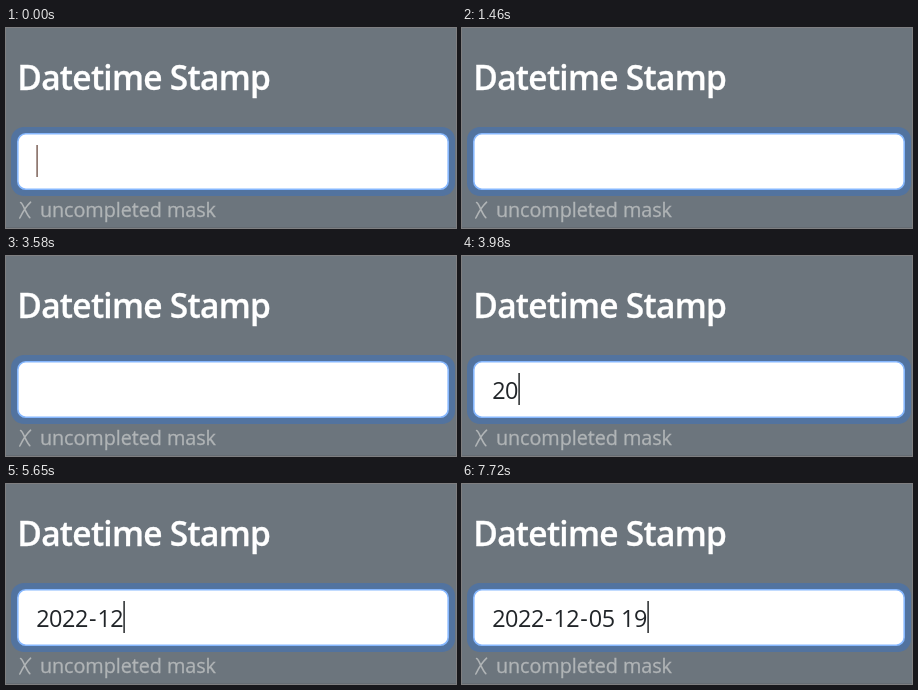
These frames come from a looping animation (450x200 px, 8 s). An HTML page:

```html
<!DOCTYPE html>
<html lang="en">
<head>
<meta charset="utf-8">
<title>Datetime Stamp</title>
<style>
  html, body { margin: 0; width: 100%; height: 100%; overflow: hidden; background: #6c757d; }
  svg { display: block; width: 450px; height: 200px; }
  text { font-family: "Open Sans", "Noto Sans", sans-serif; white-space: pre; }
  .title { font-size: 33.5px; font-weight: 600; letter-spacing: -0.72px; fill: #fff; stroke: #fff; stroke-width: 0.3px; }
  .hint { font-size: 19.8px; letter-spacing: -0.05px; fill: #b0b4b6; stroke: #b0b4b6; stroke-width: 0.3px; }
  .value { font-size: 23.4px; fill: #212529; }
</style>
</head>
<body>
<svg viewBox="0 0 450 200">
  <rect width="450" height="200" fill="#6c757d"/>
  <rect y="199" width="450" height="1" fill="#656c73"/>
  <text class="title" x="11.3" y="62">Datetime Stamp</text>
  <rect x="5" y="99" width="444" height="69" rx="13" fill="#52739f"/>
  <rect x="11.8" y="105.8" width="430.4" height="55.4" rx="8" fill="#fff" stroke="#86b7fe" stroke-width="1.6"/>
  <text class="value" id="value" y="142.8"></text>
  <rect id="caret" y="117" width="1.4" height="32"/>
  <path d="M14.6 174.5C17 175 19.6 185.5 23.8 189.6M24.6 174.2C20.5 178 16.5 184.5 13.8 190" fill="none" stroke="#b0b4b6" stroke-width="1.6" stroke-linecap="round"/>
  <text class="hint" x="33.9" y="189">uncompleted mask</text>
</svg>
<script>
const LOOP = 8000;
const STAMP = "2022-12-05 19";
const START = 30.2;
const ADVANCE = { "-": 9.6, " ": 6.5 };
const DIGIT = 12.9;

// [time, typed characters, caret x]; a null x hides the caret
const steps = [
  [0, 0, 30], [400, 0, null], [930, 0, 30], [1460, 0, null],
  [1990, 0, 30], [2520, 0, null], [3060, 0, 30], [3580, 0, null],
  [3780, 1, 42], [3980, 2, 56], [4260, 3, 68], [4450, 4, 81],
  [4980, 4, null], [5380, 6, 104], [5650, 7, 117], [5910, 9, 140],
  [6180, 10, 152], [6710, 10, null], [7190, 10, 152],
  [7260, 12, 171], [7720, 13, 185]
];

const value = document.getElementById("value");
const caret = document.getElementById("caret");

// Left edge of every character, with the narrow hyphen centred in its cell
let pen = START;
const lefts = [...STAMP].map(ch => {
  const x = pen + (ch === "-" ? 1.1 : 0);
  pen += ADVANCE[ch] || DIGIT;
  return x.toFixed(1);
});
value.setAttribute("x", lefts.join(" "));

let shown = null;

function draw(t) {
  const step = steps.findLast(s => s[0] <= t);
  if (step === shown) return;
  shown = step;
  const [time, count, x] = step;
  value.textContent = STAMP.slice(0, count);
  caret.setAttribute("visibility", x === null ? "hidden" : "visible");
  if (x !== null) caret.setAttribute("x", x + 0.4);
  caret.setAttribute("fill", time === 0 ? "#75594f" : "#16191c");
}

const begin = performance.now();
function tick() {
  draw((performance.now() - begin) % LOOP);
  requestAnimationFrame(tick);
}
tick();
</script>
</body>
</html>
```
